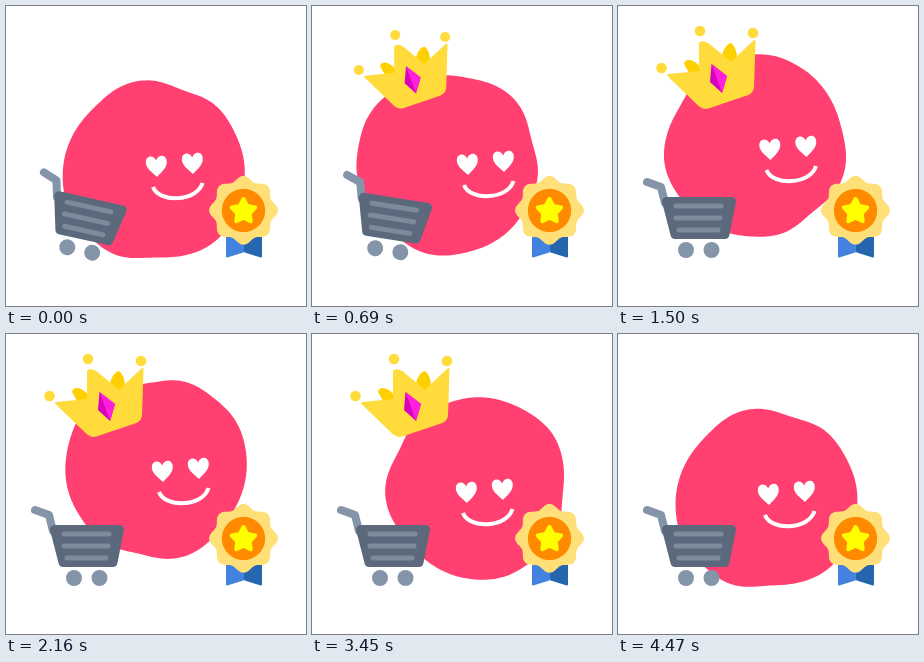
Animation of 300 by 300 pixels, one loop 4500 ms. Source, as an HTML page:

```html
<!DOCTYPE html>
<html lang="en">
<head>
<meta charset="utf-8">
<title>Happy shopper</title>
<style>
  html, body { margin: 0; width: 100%; height: 100%; overflow: hidden; background: #fff; }
  svg { display: block; width: 100%; height: 100%; }
</style>
</head>
<body>
<svg viewBox="0 0 300 300" stroke-linejoin="round">
  <defs>
    <path id="heart" fill="#fff" d="M0 11C-5 6-10.5 2-10.5-4C-10.5-11-2.5-12 0-5.5C2.5-12 10.5-11 10.5-4C10.5 2 5 6 0 11Z"/>
  </defs>

  <path id="blob" fill="#ff4070"/>

  <g id="face">
    <use href="#heart" transform="translate(150.5 160) rotate(-3)"/>
    <use href="#heart" transform="translate(186.5 157) rotate(-3)"/>
    <path d="M147 181C153 197 191 196 196.5 177" fill="none" stroke="#fff" stroke-width="4"/>
  </g>

  <g id="cart" fill="none" stroke-linecap="round">
    <path d="M29 176L43 181L47 197" stroke="#8595a9" stroke-width="8"/>
    <g fill="#8595a9"><circle cx="68" cy="244" r="8"/><circle cx="93.5" cy="244" r="8"/></g>
    <path d="M48.5 195.500H113.500L107 228.500H57Z" fill="#5c697c" stroke="#5c697c" stroke-width="9"/>
    <path d="M58 200H103M58 212H102M61 224H100" stroke="#7d8a9b" stroke-width="5"/>
  </g>

  <g id="crown">
    <g fill="#ffd000">
      <path d="M66 58C67 51 80 53 85 67L74 72Z"/>
      <path d="M104 55C103 46 108 38 113 37C117 40 119 46 119 52L112 62Z"/>
    </g>
    <g fill="#ffdb3b">
      <path d="M50 69L82 66L82 37Q85 35 90 38L113 57L136.500 35L135 82Q134 86 130 88L90 101.500Q85 103 80 98Z"
            stroke="#ffdb3b" stroke-width="2"/>
      <circle cx="43.5" cy="62" r="5.3"/><circle cx="82" cy="25" r="5.3"/><circle cx="135" cy="27" r="5.3"/>
    </g>
    <path d="M93.5 58L109 70L104 87L92 76Z" fill="#d900c0"/>
    <path d="M93.5 58L109 70L104 87Z" fill="#ff1fdc"/>
  </g>

  <g stroke-width="2">
    <path d="M221 225H237V245.500L221 250.500Z" fill="#4482df" stroke="#4482df"/>
    <path d="M239 225H255V250.500L239 245.500Z" fill="#2566ae" stroke="#2566ae"/>
  </g>
  <path id="medal" fill="#ffe078"/>
  <circle cx="237.5" cy="204.5" r="21.7" fill="#ff8a00"/>
  <path id="star" fill="#ff0" stroke="#ff0" stroke-width="4"/>
</svg>

<script>
const LOOP = 4500;
const $ = id => document.getElementById(id);
const clamp = p => Math.min(1, Math.max(0, p));
const ease = p => (1 - Math.cos(Math.PI * clamp(p))) / 2;

// Closed outline with a radius for each angle in degrees, clockwise from the top
function outline(id, cx, cy, steps, radius) {
  const pts = Array.from({ length: steps }, (_, i) => {
    const deg = 360 * i / steps, a = (deg - 90) * Math.PI / 180, r = radius(deg);
    return [cx + r * Math.cos(a), cy + r * Math.sin(a)];
  });
  $(id).setAttribute('d', 'M' + pts.join('L') + 'Z');
}

// Bumps and dents on the blob: angle, height
const bumps = [[20, -6], [63, -2], [138, 3], [182, -4], [204, 3], [245, 2.5], [295, -2], [318, -4]];

outline('blob', 148, 164, 180, deg => bumps.reduce((r, [at, height]) => {
  const d = (deg - at + 540) % 360 - 180;
  return r + height * Math.exp(-((d / 13) ** 2) / 2);
}, 91));
outline('medal', 237.5, 204.3, 160, deg => 32 + 2.4 * Math.cos(8 * deg * Math.PI / 180));
outline('star', 237.5, 205.3, 10, deg => deg % 72 ? 6.5 : 12.3);

// Stops of the face on its closed path: time, x, y
const stops = [[0, 0, 0], [690, 5, -2], [1500, 1.5, -17], [2160, 6, -23], [2730, 15.5, -22], [3450, 4, -2]];

function stop(i) {
  const n = stops.length, [t, x, y] = stops[(i + n) % n];
  return [t + LOOP * Math.floor(i / n), x, y];
}

function faceAt(t) {
  const i = stops.findLastIndex(s => s[0] <= t);
  const [a, b, c, d] = [-1, 0, 1, 2].map(k => stop(i + k));
  const h = c[0] - b[0], u = (t - b[0]) / h, v = 1 - u;
  return [1, 2].map(k => {
    const m0 = (c[k] - a[k]) / (c[0] - a[0]) * h, m1 = (d[k] - b[k]) / (d[0] - b[0]) * h;
    return v * v * ((1 + 2 * u) * b[k] + u * m0) + u * u * ((3 - 2 * u) * c[k] - v * m1);
  });
}

// Pops in, swings one and a half times, shrinks away
function crownScale(t) {
  const swing = clamp((t - 250) / 870);
  return clamp(t / 250) + 0.15 * Math.exp(-1.9 * swing) * Math.sin(3 * Math.PI * swing) - ease((t - 3460) / 290);
}

function draw() {
  const t = performance.now() % LOOP;
  const set = (id, transform) => $(id).setAttribute('transform', transform);
  set('blob', `rotate(${360 * t / LOOP} 150 150.300)`);
  set('face', `translate(${faceAt(t)})`);
  set('cart', `rotate(${12.5 * (1 - ease((t - 330) / 1000))} 77 212)`);
  set('crown', `translate(103 97) scale(${crownScale(t)}) translate(-103 -97)`);
  requestAnimationFrame(draw);
}
draw();
</script>
</body>
</html>
```
